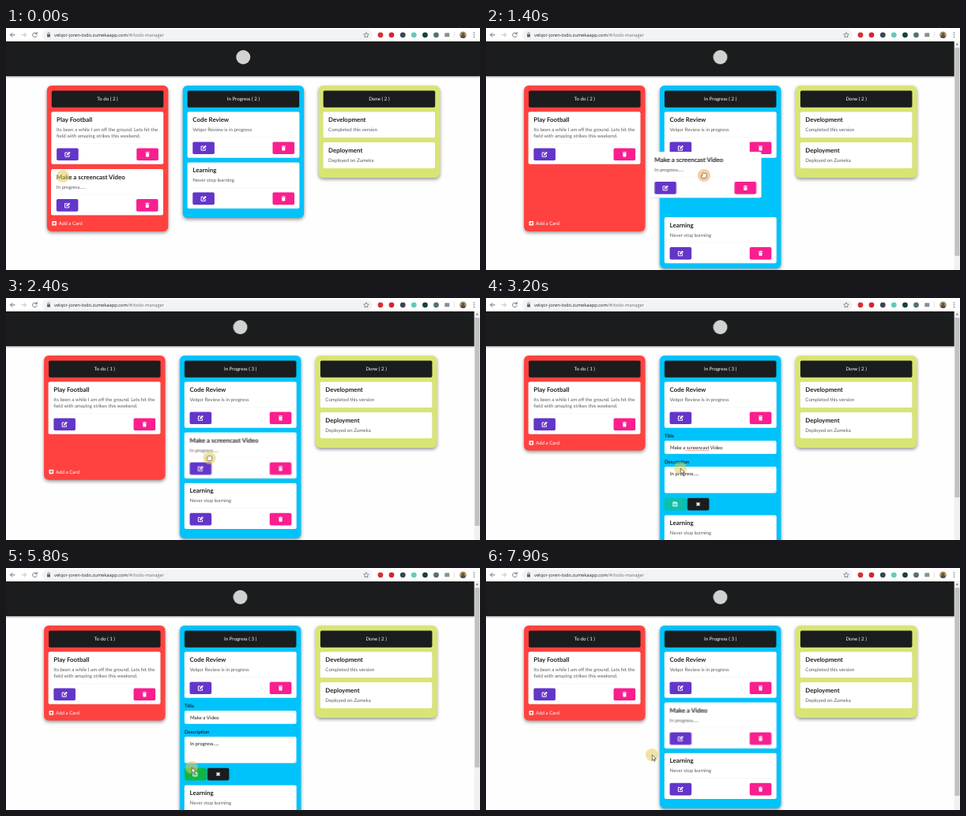
An HTML page for the animation above (8 s loop, 600x307 px).

```html
<!DOCTYPE html>
<html lang="en">
<head>
<meta charset="utf-8">
<title>Todo board</title>
<style>
html, body { margin: 0; width: 100%; height: 100%; overflow: hidden; background: #fefefe; }
svg { display: block; width: 600px; height: 307px; }
text { font: 6.15px Lato, sans-serif; text-rendering: geometricPrecision; white-space: pre; }
.title { font-size: 7.9px; font-weight: 700; fill: #222; }
.desc { fill: #5c5c5c; }
.head { fill: #fff; text-anchor: middle; }
.label { font-weight: 500; fill: #111; }
.input { fill: #1c1c1c; }
.url { font: 5.75px "Open Sans", sans-serif; }
.col { filter: drop-shadow(0 2px 2px rgba(0,0,0,.42)); }
.paper { filter: drop-shadow(0 .4px .5px rgba(0,0,0,.28)); }
.icon { fill: none; stroke: #fff; stroke-width: 1; }

/* one 8 s loop; 1% = 80 ms */
.anim { animation: 8s linear infinite; }
.cut { animation: 8s step-end infinite; }
#page { animation-name: page; }
#bar { animation-name: bar; }
#thumb { animation-name: thumb; }
#todo { animation-name: todo; }
#add { animation-name: add; }
#doing { animation-name: doing; }
#learn { animation-name: learn; }
#drag { animation-name: drag; }
#form { animation-name: form; }
#save { animation-name: save; }
#select { animation-name: select; }
#mouse { animation-name: mouse; }
#halo { animation-name: halo; }
#press { animation-name: press; }
#hand { animation-name: hand; }
#beam { animation-name: beam; }
#arrow { animation-name: arrow; }
.before { animation-name: before; }
.after { animation-name: after; }
.long { animation-name: long; }
.short { animation-name: short; }
.view { animation-name: view; }

@keyframes page { 0% { transform: none } 16.25%, 100% { transform: translateX(-3.75px) } }
@keyframes bar { 0% { visibility: hidden } 16.25%, 100% { visibility: visible } }
@keyframes thumb { 0% { height: 264px } 40% { height: 228px } 77.5%, 100% { height: 264px } }
@keyframes todo { 0%, 28.75% { height: 185px } 30% { height: 158px } 31.25%, 100% { height: 120.5px } }
@keyframes add { 0%, 28.75% { transform: none } 30% { transform: translateY(-27px) } 31.25%, 100% { transform: translateY(-64px) } }
@keyframes doing { 0% { height: 168px } 16.25% { height: 232px } 40% { height: 274px } 77.5%, 100% { height: 232px } }
@keyframes learn {
  0%, 14.5% { transform: none }
  17.5%, 26.25% { transform: translateY(69.5px) }
  28.75%, 39.99% { transform: translateY(64.2px) }
  40%, 77.49% { transform: translateY(105px) }
  77.5%, 100% { transform: translateY(64.2px) }
}
@keyframes drag {
  0%, 11.25% { transform: none }
  13.75% { transform: translate(28px, -9px) }
  16.25% { transform: translate(138px, -20px) }
  17.5%, 25% { transform: translate(153.3px, -22px) }
  28.75%, 100% { transform: translate(172.5px, -8.5px) }
}
@keyframes form { 0% { visibility: hidden } 40% { visibility: visible } 77.5%, 100% { visibility: hidden } }
@keyframes view { 0% { opacity: 1 } 40% { opacity: 0 } 77.5%, 100% { opacity: 1 } }
@keyframes before { 0% { opacity: 1 } 28.75%, 100% { opacity: 0 } }
@keyframes after { 0% { opacity: 0 } 28.75%, 100% { opacity: 1 } }
@keyframes long { 0% { opacity: 1 } 60%, 100% { opacity: 0 } }
@keyframes short { 0% { opacity: 0 } 60%, 100% { opacity: 1 } }
@keyframes save { 0% { fill: #21ba45; opacity: .45 } 60% { fill: #21ba45; opacity: 1 } 70%, 100% { fill: #12b544; opacity: 1 } }
@keyframes select { 0% { opacity: 0 } 50% { opacity: .4 } 60%, 100% { opacity: 0 } }
@keyframes mouse {
  0%, 1.25% { transform: translate(72px, 188px) }
  6.25%, 8.75% { transform: translate(126px, 209px) }
  13% { transform: translate(274px, 187px) }
  13.75% { transform: translate(274px, 187px) }
  17.5%, 25% { transform: translate(276px, 187px) }
  30% { transform: translate(257.5px, 203px) }
  37.5%, 40% { transform: translate(246px, 216px) }
  46.25%, 66.25% { transform: translate(260px, 189px) }
  72.5%, 80% { transform: translate(235px, 253px) }
  87.5%, 100% { transform: translate(210px, 237px) }
}
@keyframes halo {
  0% { fill: #e3cc55 } 7.5% { fill: #f0a850 } 25% { fill: #e3cc55 }
  38.75% { fill: #f0a850 } 40% { fill: #e3cc55 }
  47.5% { fill: #f0a040 } 51.25% { fill: #e3cc55 }
  76.25% { fill: #f0a850 } 78.75%, 100% { fill: #e3cc55 }
}
@keyframes press { 0% { opacity: 0 } 47.5% { opacity: .8 } 50%, 100% { opacity: 0 } }
@keyframes hand { 0% { opacity: 0 } 7.5% { opacity: 1 } 36.25%, 100% { opacity: 0 } }
@keyframes beam { 0% { opacity: 0 } 46.25% { opacity: 1 } 67.5%, 100% { opacity: 0 } }
@keyframes arrow { 0% { opacity: 0 } 36.25% { opacity: 1 } 46.25% { opacity: 0 } 67.5%, 100% { opacity: 1 } }
</style>
</head>
<body>
<svg id="stage" viewBox="0 0 600 307"></svg>
<script>
const box = (x, y, w, h, fill, r = 2, attrs = "") =>
  `<rect x="${x}" y="${y}" width="${w}" height="${h}" rx="${r}" fill="${fill}" ${attrs}/>`;
const dot = (x, y, r, fill, attrs = "") => `<circle cx="${x}" cy="${y}" r="${r}" fill="${fill}" ${attrs}/>`;
const text = (x, y, cls, str) => `<text x="${x}" y="${y}" class="${cls}">${str}</text>`;
const at = (x, y, body, attrs = "") => `<g transform="translate(${x} ${y})" ${attrs}>${body}</g>`;
const line = (d, attrs = "") => `<path d="${d}" fill="none" ${attrs}/>`;

// icons, centred on 0,0
const pencil = `<path class="icon" d="M0-2.2H-3V3H2.2V.6"/><path fill="#fff" d="M-1.2 1.4L-.9-.3 2.2-3.4 3.6-2 .5 1.1z"/>`;
const trash = `<path fill="#fff" d="M-2.6-2.7H-1L-.6-3.3H.6L1-2.7H2.6V-1.9H-2.6zM-2.2-1.4H2.2L1.9 3.2H-1.9z"/>`;
const floppy = `<path class="icon" stroke-width=".8" d="M-2.5-2.5H1.5L2.5-1.5V2.5H-2.5zM-1.2-2.5V-.8H1V-2.5"/>` + dot(0, 1, .7, "#fff");
const cross = `<path class="icon" style="stroke-width:1.7" d="M-1.9-1.9L1.9 1.9M1.9-1.9L-1.9 1.9"/>`;

// a card with its buttons below the description lines, unless plain
function card(title, lines, plain) {
  const h = plain ? 33 : 50.4 + 8 * lines.length;
  const top = h - 20.3;
  const name = Array.isArray(title)
    ? `<g class="cut long">${text(6.8, 12.5, "title", title[0])}</g><g class="cut short">${text(6.8, 12.5, "title", title[1])}</g>`
    : text(6.8, 12.5, "title", title);
  return box(0, 0, 142, h, "#fff", 2, 'class="paper"') + name +
    lines.map((s, i) => text(6.8, 24.7 + 8 * i, "desc", s)).join("") +
    (plain ? "" :
      line(`M7 ${top - 6}H135`, 'stroke="#eee" stroke-width=".5"') +
      box(6.8, top, 27.6, 15.6, "#6435c9", 1.8) + at(20.6, top + 7.8, pencil) +
      box(108, top, 27.6, 15.6, "#fa1e8e", 1.8) + at(121.8, top + 7.8, trash));
}

function column(x, h, fill, id, head) {
  return box(x, 73, 153.5, h, fill, 6, `id="${id}" class="col anim ${id === "doing" ? "cut" : ""}"`) +
    box(x + 6, 79.5, 141.5, 21.3, "#1b1c1d", 1.8) + head(x + 76.7);
}

const counts = (name, a, b) => x =>
  `<g class="cut before">${text(x, 92.3, "head", `${name} ( ${a} )`)}</g>` +
  `<g class="cut after">${text(x, 92.3, "head", `${name} ( ${b} )`)}</g>`;

const form = `<g id="form" class="cut">
  ${text(229.7, 177.2, "label", "Title")}
  ${box(229.7, 181, 141.6, 16.8, "#fff", 1.8)}
  ${box(256.3, 184.5, 30.5, 9.5, "#3390ff", 0, 'id="select" class="cut"')}
  <g class="cut long">${text(236.7, 191.7, "input", "Make a screencast Video")}
  ${line("M256.5 193.6H286.5", 'stroke="#e33" stroke-width=".7" stroke-dasharray="1 .6"')}</g>
  <g class="cut short">${text(236.7, 191.7, "input", "Make a Video")}</g>
  ${text(229.7, 210.2, "label", "Description")}
  ${box(229.7, 214, 141.6, 33.5, "#fff", 1.8)}
  ${text(236.7, 225, "input", "In progress.....")}
  ${line("M370.6 244.3L368 246.9M370.6 245.8L369.5 246.9", 'stroke="#888" stroke-width=".4"')}
  ${box(229.7, 253.7, 28, 15.7, "#21ba45", 1.8, 'id="save" class="cut"')}
  ${at(243.2, 261.5, floppy)}
  ${box(258.7, 253.7, 27.5, 15.7, "#1b1c1d", 1.8)}
  ${at(272.3, 261.5, cross)}
</g>`;

const page = `<g id="page" class="cut">
  ${dot(300.3, 37, 9, "#d2d2d2")}
  ${column(51.8, 185, "#ff4240", "todo", counts("To do", 2, 1))}
  ${column(223.7, 168, "#00c3fb", "doing", counts("In Progress", 2, 3))}
  ${column(395.7, 117, "#d9e573", "done", x => text(x, 92.3, "head", "Done ( 2 )"))}
  ${at(57.3, 106.3, card("Play Football", ["Its been a while I am off the ground. Lets hit the", "field with amazing strikes this weekend."]))}
  <g id="add" class="anim">
    ${box(58.3, 245, 5.6, 5.6, "#fff", .8)}
    ${line("M59.3 247.8H62.9M61.1 246V249.6", 'stroke="#ff4240"')}
    <g fill="#fff">${text(66.8, 250, "", "Add a Card")}</g>
  </g>
  ${at(229.5, 106.3, card("Code Review", ["Velqor Review is in progress"]))}
  <g id="learn" class="anim">${at(229.5, 170.5, card("Learning", ["Never stop learning"]))}</g>
  ${at(401.3, 106.3, card("Development", ["Completed this version"], true))}
  ${at(401.3, 145, card("Deployment", ["Deployed on Zumeka"], true))}
  ${form}
  <g class="cut view"><g id="drag" class="anim">
    ${at(57, 179, card(["Make a screencast Video", "Make a Video"], ["In progress....."]))}
  </g></g>
</g>`;

const scrollbar = `<g id="bar" class="cut">
  ${box(592.7, 17, 7.3, 290, "#f1f1f1", 0)}
  <path fill="#666" d="M596.3 19.5l1.6 2h-3.2z"/>
  ${box(593.4, 25, 6, 264, "#c1c1c1", 0, 'id="thumb" class="cut"')}
</g>`;

const ink = 'stroke="#5f6368" stroke-width=".9"';
const extensions = [[474, "#d8302c"], [488, "#d8232f"], [502.3, "#3c4650"], [516.3, "#63c9bd"], [530.5, "#17423d"], [544.5, "#557078"]];
const toolbar = `
  ${box(0, 0, 600, 17, "#fff", 0)}
  ${box(46, 2, 418, 13.6, "#f1f3f4", 6.8)}
  ${line("M11.5 8.8H5.5M8.3 6L5.5 8.8 8.3 11.6", ink)}
  ${line("M19.5 8.8H25.5M22.7 6L25.5 8.8 22.7 11.6", 'stroke="#b5b8bb" stroke-width=".9"')}
  ${line("M38.6 7A2.8 2.8 0 1 0 39.2 9.4M39.2 5V7.5H36.7", ink)}
  ${box(52, 8, 4, 3.4, "#5f6368", .5)}
  ${line("M52.8 8V7a1.2 1.2 0 0 1 2.4 0V8", 'stroke="#5f6368" stroke-width=".7"')}
  <text x="61" y="10.9" class="url" fill="#222">velqor-joren-todo.zumekaapp.com<tspan fill="#6b6f73">/#/todo-manager</tspan></text>
  ${line("M456 5.6l1 2.1 2.3.3-1.7 1.6.4 2.3-2-1.1-2 1.1.4-2.3-1.7-1.6 2.3-.3z", 'stroke="#5f6368" stroke-width=".7"')}
  ${extensions.map(([x, c]) => dot(x, 8.8, 3.4, c)).join("")}
  ${box(555.3, 6.3, 6, 5, "#8b8e92", .6)}
  ${line("M567.5 5V12.5", 'stroke="#ccc" stroke-width=".5"')}
  ${dot(578.5, 8.8, 4.3, "#a98a5c")}
  <path fill="#54504a" d="M575.4 11.8a3.1 3.1 0 0 1 6.2 0a4.3 4.3 0 0 1-6.2 0z"/>${dot(578.5, 7.4, 1.5, "#54504a")}
  ${[6, 8.8, 11.6].map(y => dot(592.5, y, .75, "#5f6368")).join("")}`;

const mouse = `<g id="mouse" class="anim">
  ${dot(0, 0, 8, "#e3cc55", 'id="halo" class="cut" fill-opacity=".55"')}
  ${dot(0, 0, 3.4, "#e8322a", 'id="press" class="cut"')}
  <path id="hand" class="cut" fill="#fff" stroke="#333" stroke-width=".6"
    d="M-2.4 3.6L-3.6.6Q-3.2-.6-2.2.2V-2.2Q-1.6-3.2-.9-2.4Q-.2-3.6.6-2.5Q1.4-3.2 2-2.2Q3-2.6 3.2-1.4V1L2.2 3.6z"/>
  <path id="beam" class="cut" fill="none" stroke="#333" stroke-width=".6" d="M-1.3-3.4H1.3M0-3.4V3.4M-1.3 3.4H1.3"/>
  <path id="arrow" class="cut" fill="#fff" stroke="#222" stroke-width=".6" d="M.3 0V7.2L2 5.7 3.1 8.2 4.2 7.7 3.1 5.3 5.4 5.2z"/>
</g>`;

document.getElementById("stage").innerHTML =
  box(0, 0, 600, 307, "#fefefe", 0) +
  box(0, 17, 600, 44, "#1b1c1d", 0, 'style="filter:drop-shadow(0 1px 1.2px rgba(0,0,0,.45))"') +
  page + scrollbar + toolbar + mouse;
</script>
</body>
</html>
```
